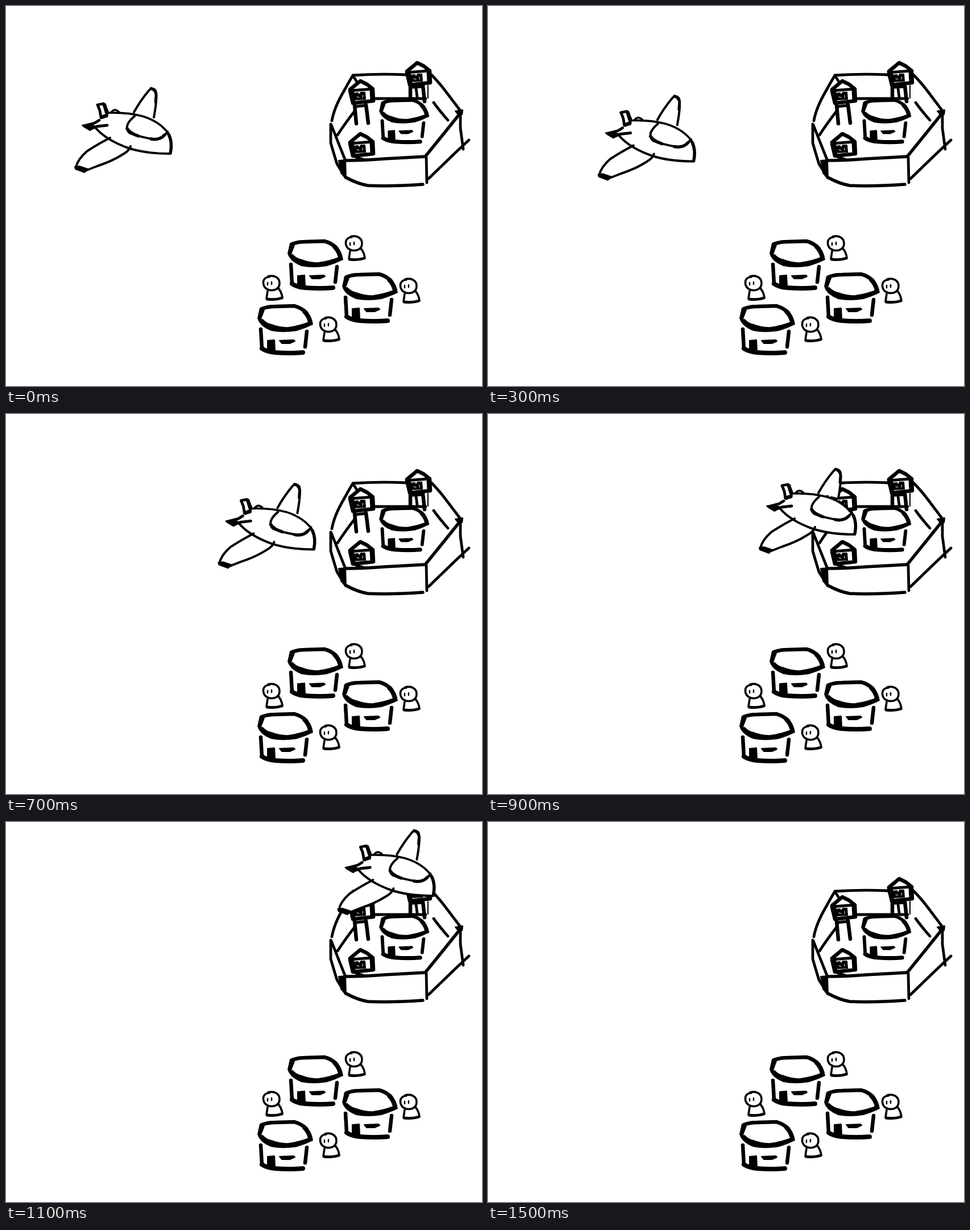
An HTML page that plays this animation: 837 px wide and 669 px high, repeating every 1.6 s.

```html
<!DOCTYPE html>
<html>
<head>
<meta charset="utf-8">
<title>Plane over the fort</title>
<style>
  html, body { margin: 0; width: 100%; height: 100%; overflow: hidden; background: #fff; }
  svg { display: block; width: 837px; height: 669px; }
  path { fill: none; stroke: #000; stroke-width: 4.8; stroke-linecap: round; stroke-linejoin: round; }
  .white { fill: #fff; }
  .mask { fill: #fff; stroke: none; }
  .black { fill: #000; stroke-width: 2; }
  .thin { stroke-width: 3.6; }
  .thick { stroke-width: 6.5; }
  .heavy { stroke-width: 8; }
</style>
</head>
<body>
<svg viewBox="0 0 837 669">
  <defs>
    <g id="house">
      <path class="mask" d="M503 418L525 413L561 414L591 444L581 456L579 494L540 499L502 491L500 452L496 436Z"/>
      <path class="thick" d="M503 419Q513 415 526 415L560 414Q572 417 581 426"/>
      <path class="heavy" d="M578 424Q585 431 588 442"/>
      <path class="black" d="M500 418L507 421L501 437L496 436Z"/>
      <path class="black" d="M497 438L504 438Q510 445 520 447Q535 453 550 452Q572 449 590 441L592 446Q578 453 564 457Q540 461 520 457Q502 450 497 438Z"/>
      <path class="thick" d="M501 455L503 489M582 459L579 486"/>
      <path class="heavy" d="M503 489Q512 495 526 496Q553 498 575 496"/>
      <path class="black" d="M513 475L525 474L526 493L513 491Z"/>
      <path class="black" d="M534 475L559 474L561 476L552 480H538Z"/>
    </g>
    <g id="person">
      <path class="white thin" d="M605 432L603 445Q617 449 631 444Q630 434 624 427"/>
      <path d="M604 446Q618 448 630 444"/>
      <path class="white thin" d="M606 406C616 403 626 408 626 418C626 428 617 432 608 430C600 428 596 421 598 413Q601 407 608 407"/>
      <path style="stroke-width:2.4" d="M605 417V421M612 416V420"/>
    </g>
    <g id="tower">
      <path class="white thick" d="M605 147L623 132L635 138L645 146L646 167L610 171L605 150"/>
      <path d="M606 149L645 146M642 149L643 167M610 151L612 170"/>
      <path class="black" d="M612 154L619 153L620 158L624 152L631 152L632 164L613 165Z"/>
      <path d="M617 160L621 161M627 157V161" style="stroke:#fff;stroke-width:1"/>
    </g>
  </defs>

  <g id="fort">
    <path d="M610 122Q655 119 703 121M610 122Q601 137 594 150Q577 179 573 202M611 124L616 132"/>
    <path d="M748 121Q760 133 773 150L801 187M752 170Q762 184 777 201"/>
    <path d="M648 163H738"/>
    <path d="M571 208L571 241Q577 262 582 278L597 302M572 209Q580 230 596 270M583 227Q596 207 613 185"/>
    <path style="stroke-width:5.5" d="M800 187Q777 216 738 264"/>
    <path class="black" d="M790 185L803 183L802 191L797 194Z"/>
    <path d="M799 190L799 215L804 252M814 236Q790 258 743 304M739 266L740 311"/>
    <path style="stroke-width:5.5" d="M598 272Q630 272 665 269L738 265M598 302Q618 313 636 316Q675 318 733 314"/>
    <path class="black" d="M585 272L597 271L598 304L589 294Z"/>
    <path class="thick" d="M613 175L616 207M633 174L637 206M711 142L711 159M733 140L736 168"/>
    <path d="M615 177L632 175M714 143L730 142M721 145L723 160M615 266L631 271"/>
    <path style="stroke-width:2" d="M742 140V162"/>
    <use href="#tower"/>
    <use href="#tower" x="100" y="-32"/>
    <use href="#tower" y="93"/>
    <use href="#house" transform="translate(210.6 -202.7) scale(.9 .89)"/>
  </g>

  <use href="#house"/>
  <use href="#house" x="96" y="58"/>
  <use href="#house" x="-53" y="114"/>
  <use href="#person"/>
  <use href="#person" x="-145" y="70"/>
  <use href="#person" x="96" y="75"/>
  <use href="#person" x="-45" y="143"/>

  <g id="plane">
    <path class="white" style="stroke-width:4" d="M225 187Q236 167 251 149Q257 142 263 149Q267 158 260 196"/>
    <path d="M255 145Q263 148 264 156L263 169"/>
    <path class="mask" d="M158 215L178 190Q205 185 240 195Q292 214 291 259Q260 263 215 251Q180 240 158 215Z"/>
    <path class="white" style="stroke-width:4" d="M183 232Q160 244 142 256Q126 270 123 284L137 291L160 282Q187 273 204 262Q217 255 219 247"/>
    <path class="black" d="M121 283L129 282L144 287L138 293L122 287Z"/>
    <path class="thin" d="M180 188Q214 187 240 194Q273 204 288 228"/>
    <path style="stroke-width:4" d="M158 215Q176 236 215 250Q245 260 289 260"/>
    <path class="thick" style="stroke-width:5.5" d="M286 226Q293 240 289 259"/>
    <path style="stroke-width:4" d="M226 194Q215 203 213 211Q212 220 218 224Q233 230 262 235Q276 234 284 221"/>
    <path class="thick" style="stroke-width:5.5" d="M213 216Q218 224 233 229M255 234Q270 237 279 227"/>
    <path class="thin" d="M185 187Q191 179 199 187"/>
    <path class="white" d="M164 201L156 206L137 211L147 217L160 212L178 210"/>
    <path class="black" d="M134 210L147 208L158 212L148 219Z"/>
    <path class="white" d="M161 174L171 172L178 185L177 194L167 196L165 184Z"/>
    <path class="thick" d="M173 174L177 187M168 196L176 193"/>
  </g>
</svg>
<script>
  const plane = document.getElementById('plane');
  const STEP = 100, STEPS = 16;
  // Flight path corners: step, x, y
  const path = [[0, 0, 0], [4, 97, 18], [9, 356, -48], [14, 622, -253]];

  function draw(now) {
    const step = Math.floor(now / STEP) % STEPS;
    const visible = step <= 14;
    plane.style.display = visible ? '' : 'none';
    if (visible) {
      const end = Math.max(1, path.findIndex(p => p[0] >= step));
      const [s0, x0, y0] = path[end - 1], [s1, x1, y1] = path[end];
      const k = (step - s0) / (s1 - s0);
      plane.setAttribute('transform', `translate(${x0 + (x1 - x0) * k} ${y0 + (y1 - y0) * k})`);
    }
  }

  const start = performance.now();
  function tick() {
    draw(performance.now() - start);
    requestAnimationFrame(tick);
  }
  tick();
</script>
</body>
</html>
```
